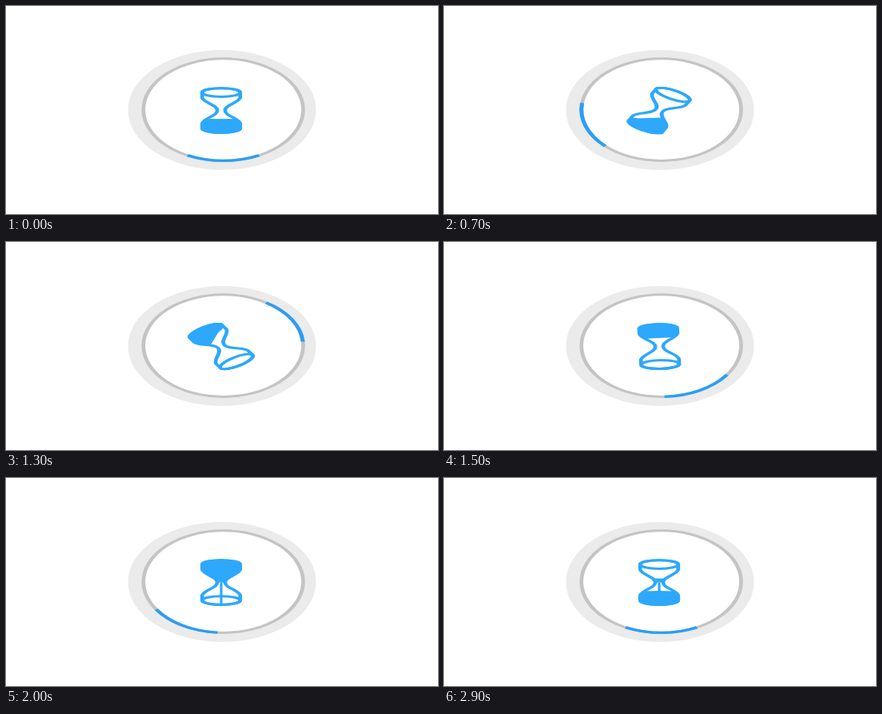
An HTML page with a canvas that plays this animation: 540x260 px, repeating every 3000 ms.

```html
<!DOCTYPE html>
<html>
<head>
<meta charset="utf-8">
<style>
  html, body { margin: 0; width: 100%; height: 100%; overflow: hidden; background: #fff; }
  canvas { display: block; }
</style>
</head>
<body>
<canvas id="stage" width="540" height="260"></canvas>
<script>
const ctx = document.getElementById('stage').getContext('2d');
const LOOP = 3000, STEP = 100, STRETCH = 1.565;
const BLUE = '#2da8fc', ARC_BLUE = '#2b9ef6';
const rad = deg => deg * Math.PI / 180;
const clamp = v => Math.max(0, Math.min(1, v));

// Poses as [time, degrees clockwise]
const GLASS_TURN = [[0, 0], [350, -9], [400, -8], [700, 29], [1300, 147], [1650, 189], [1700, 188], [2000, 180]];
const RING_TURN = [[0, 0], [200, -22], [370, -38], [400, -37.5], [600, 36], [700, 71], [1200, 200],
  [1300, 239], [1700, 391.5], [1850, 397], [2400, 354], [2550, 348.5], [2900, 360]];

// Smooth curve through the poses, flat at turning points
function follow(poses, t) {
  const last = poses.length - 1;
  if (t >= poses[last][0]) return poses[last][1];
  let i = 0;
  while (t >= poses[i + 1][0]) i++;
  const rate = k => (poses[k + 1][1] - poses[k][1]) / (poses[k + 1][0] - poses[k][0]);
  const slope = k => {
    if (k === 0 || k === last) return 0;
    const a = rate(k - 1), b = rate(k);
    return a * b <= 0 ? 0 : 2 * a * b / (a + b);
  };
  const [t0, v0] = poses[i], [t1, v1] = poses[i + 1];
  const span = t1 - t0, u = (t - t0) / span;
  return v0 + (v1 - v0) * u * u * (3 - 2 * u)
    + span * u * (1 - u) * (slope(i) * (1 - u) - slope(i + 1) * u);
}

function glassPath() {
  const p = new Path2D(), w = 15.2, neck = 3.1;
  p.moveTo(-w, -22.5);
  p.lineTo(-w, -16);
  p.bezierCurveTo(-14, -9.5, -neck, -7, -neck, 0);
  p.bezierCurveTo(-neck, 7, -14, 9.5, -w, 16);
  p.lineTo(-w, 22.5);
  p.ellipse(0, 22.5, w, 5.4, 0, Math.PI, 0, true);
  p.lineTo(w, 16);
  p.bezierCurveTo(14, 9.5, neck, 7, neck, 0);
  p.bezierCurveTo(neck, -7, 14, -9.5, w, -16);
  p.lineTo(w, -22.5);
  p.ellipse(0, -22.5, w, 5.4, 0, 0, Math.PI, true);
  p.closePath();
  return p;
}
const GLASS = glassPath();

function ellipse(x, y, rx, ry) {
  ctx.beginPath();
  ctx.ellipse(x, y, rx, ry, 0, 0, 2 * Math.PI);
}

function drawRing(t) {
  ctx.fillStyle = '#ebebeb';
  ellipse(270, 130, 117.5, 75);
  ctx.fill();
  ctx.save();
  ctx.translate(271.6, 129.6);
  ctx.scale(STRETCH, 1);
  ctx.beginPath();
  ctx.arc(0, 0, 63.8, 0, 2 * Math.PI);
  ctx.fillStyle = '#fff';
  ctx.fill();
  ctx.lineWidth = 3;
  ctx.strokeStyle = '#c4c4c4';
  ctx.stroke();
  const mid = 90 + follow(RING_TURN, t);
  ctx.beginPath();
  ctx.arc(0, 0, 63.8, rad(mid - 26.5), rad(mid + 26.5));
  ctx.lineWidth = 3.2;
  ctx.strokeStyle = ARC_BLUE;
  ctx.stroke();
  ctx.restore();
}

function drawRestingSand(turn) {
  ctx.translate(0, 10.5);
  ctx.rotate(-rad(65 * Math.sin(rad(turn))));
  ctx.fillRect(-60, 0, 120, 60);
}

function drawRunningSand(t) {
  const level = -29.5 + (t - 2000) * 0.0272;
  const fill = clamp((t - 2400) / 500);
  ctx.fillRect(-20, level, 40, -level);
  ctx.fillRect(-1, 0, 2, 28);
  const start = clamp((t - 2000) / 400);
  ellipse(0, 29, start * 6 + 54 * fill * fill, start * 4 + 14.5 * fill);
  ctx.fill();
}

function drawHourglass(t) {
  const running = t >= 2000;
  const turn = running ? 0 : follow(GLASS_TURN, t);
  ctx.save();
  ctx.beginPath();
  ctx.rect(222, 101, 94, 59.5);
  ctx.clip();
  ctx.translate(269, 130.6);
  ctx.scale(STRETCH, 1);
  ctx.rotate(rad(turn));
  ctx.fillStyle = ctx.strokeStyle = BLUE;
  ctx.save();
  ctx.clip(GLASS);
  if (running) drawRunningSand(t);
  else drawRestingSand(turn);
  ctx.restore();
  ctx.lineWidth = 3;
  ctx.lineJoin = 'round';
  ctx.stroke(GLASS);
  for (const y of [-22.5, 22.5]) {
    ellipse(0, y, 15.2, 5.4);
    ctx.stroke();
  }
  ctx.restore();
}

function frame() {
  const t = Math.floor(performance.now() % LOOP / STEP) * STEP;
  ctx.fillStyle = '#fff';
  ctx.fillRect(0, 0, 540, 260);
  drawRing(t);
  drawHourglass(t);
  requestAnimationFrame(frame);
}
frame();
</script>
</body>
</html>
```
